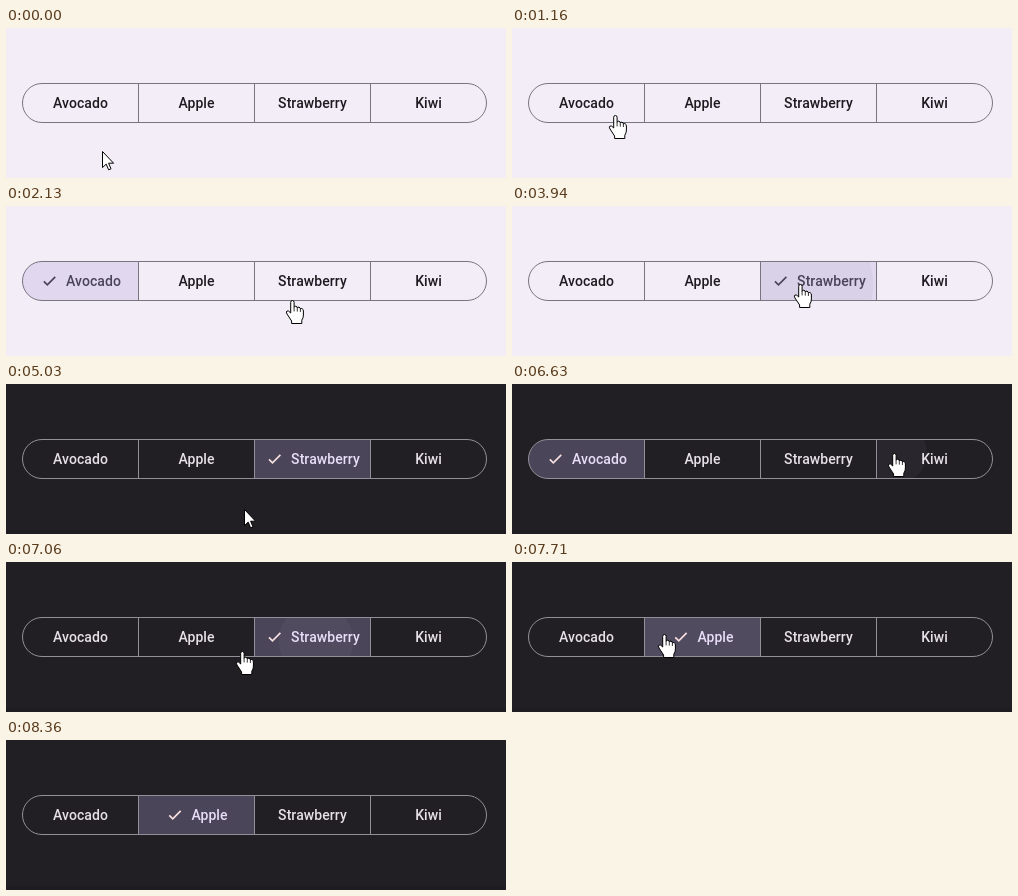
An HTML page for the animation above (8.77 s loop, 500 px wide and 150 px high).

```html
<!DOCTYPE html>
<html lang="en">
<head>
<meta charset="utf-8">
<title>Segmented button</title>
<style>
  html, body { margin: 0; width: 100%; height: 100%; overflow: hidden; }
  svg { display: block; width: 100vw; height: 100vh; }
  text { font: 500 14px Roboto, sans-serif; letter-spacing: .08px; text-anchor: middle; }
</style>
</head>
<body>
<svg viewBox="0 0 500 150">
  <defs id="defs">
    <clipPath id="pill"><rect x="16.5" y="55.5" width="464" height="39" rx="19.5"/></clipPath>
  </defs>
  <rect id="page" width="500" height="150"/>
  <rect id="edge" y="146" width="500" height="4" fill="#1e1c21"/>
  <g id="fills" clip-path="url(#pill)"></g>
  <g id="frame" fill="none">
    <rect x="16.5" y="55.5" width="464" height="39" rx="19.5"/>
    <path d="M132.5 55.5v39M248.5 55.5v39M364.5 55.5v39"/>
  </g>
  <g id="labels"></g>
  <path id="check" d="M-5.6 .3 -2.1 3.8 5.8 -4.1" fill="none" stroke-width="1.7"/>
  <g id="cursor" fill="#fff" stroke="#000" stroke-linejoin="round">
    <path id="arrow" d="M.5.5V16.6L4.2 13.1 6.6 18.8 9 17.8 6.6 12.2H11.6Z"/>
    <g id="hand">
      <path d="M-2.3 2.3Q-2.3.5-.6.5Q1.1.5 1.1 2.3V7.4Q1.4 6 2.8 6.2Q4.3 6.4 4.3 8Q4.8 6.9 6 7.2Q7.4 7.6 7.4 9Q8.2 8.2 9.2 8.7Q10.4 9.3 10.4 11V15Q10.4 18 8.8 20.2V23.5H-1.4V21L-6 14Q-7.3 11.8-6 11Q-4.5 10.2-2.3 13Z"/>
      <path d="M1.1 7.4v4M4.3 8v3.6M7.4 9v3" fill="none" stroke-width=".8"/>
    </g>
  </g>
</svg>
<script>
const LOOP = 8770, DARK_AT = 4040;
const SEG = 116, LEFT = 16.5, TOP = 55.5, HEIGHT = 39;
const GROW = 330, RADIUS = 72, SELECT_DELAY = 160;
const names = ['Avocado', 'Apple', 'Strawberry', 'Kiwi'];

const light = { page: '#f3edf7', line: '#79747e', text: '#1d1b20', fill: '#e1d8f0', on: '#4a4458', check: '#4a4458', layer: '#1d1b20' };
const dark = { page: '#211f24', line: '#938f99', text: '#e6e0e9', fill: '#4b4559', on: '#e8def8', check: '#f6e0df', layer: '#e6e0e9' };

// Pointer moves after its first rest: start, end, where to.
const rest = { x: 96, y: 123 };
const moves = [
  { from: 60, to: 270, x: 91, y: 119 },
  { from: 530, to: 1400, x: 105, y: 84 },
  { from: 1735, to: 2280, x: 303, y: 95 },
  { from: 2510, to: 2850, x: 289, y: 78 },
  { from: 4890, to: 5040, x: 238, y: 125 },
  { from: 5040, to: 5420, x: 85, y: 82 },
  { from: 5840, to: 6470, x: 383, y: 69 },
  { from: 6720, to: 7060, x: 237, y: 89 },
  { from: 7060, to: 7300, x: 153, y: 72 },
  { from: 7690, to: 8350, x: 480, y: 152 }
];

const $ = id => document.getElementById(id);
const clamp = v => Math.max(0, Math.min(1, v));
const ease = u => u < .5 ? 4 * u ** 3 : 1 - 4 * (1 - u) ** 3;

function set(el, attrs) {
  for (const key in attrs) el.setAttribute(key, attrs[key]);
}

function add(parent, tag, attrs) {
  const el = document.createElementNS('http://www.w3.org/2000/svg', tag);
  set(el, attrs);
  return parent.appendChild(el);
}

function pointer(t) {
  let { x, y } = rest;
  for (const m of moves) {
    const s = ease(clamp((t - m.from) / (m.to - m.from)));
    x += (m.x - x) * s;
    y += (m.y - y) * s;
  }
  return { x, y };
}

function segmentAt({ x, y }) {
  const i = Math.floor((x - LEFT) / SEG);
  return y >= TOP && y <= TOP + HEIGHT && i in names ? i : -1;
}

const cells = names.map((name, i) => {
  const box = { x: LEFT + SEG * i, y: TOP, width: SEG, height: HEIGHT };
  add(add($('defs'), 'clipPath', { id: 'seg' + i }), 'rect', box);
  const label = add($('labels'), 'text', { y: 80 });
  label.textContent = name;
  return { label, center: box.x + SEG / 2, fill: add($('fills'), 'rect', box) };
});

// Each press selects the segment under the pointer.
const presses = [1500, 2850, 5430, 6485, 6890, 7180].map(time => {
  const tip = pointer(time), seg = segmentAt(tip);
  const group = add($('fills'), 'g', { 'clip-path': `url(#seg${seg})` });
  return { time, seg, wave: add(group, 'circle', { cx: tip.x, cy: tip.y }) };
});

function draw(t) {
  const isDark = t >= DARK_AT, c = isDark ? dark : light;
  const tip = pointer(t), over = segmentAt(tip);
  const last = presses.filter(p => p.time + SELECT_DELAY <= t).pop();
  const chosen = last ? last.seg : -1;

  set($('page'), { fill: c.page });
  set($('edge'), { visibility: isDark ? 'visible' : 'hidden' });
  set($('frame'), { stroke: c.line });

  cells.forEach(({ label, fill, center }, i) => {
    const on = i === chosen;
    set(fill, { fill: on ? c.fill : 'none' });
    set(label, { x: center + (on ? 13 : 0), fill: on ? c.on : c.text });
  });

  set($('check'), { visibility: last ? 'visible' : 'hidden', stroke: c.check });
  if (last) {
    const { label, center } = cells[chosen];
    set($('check'), { transform: `translate(${center - label.getComputedTextLength() / 2 - 3.5} 75)` });
  }

  // A ripple stays until it has grown, or longer while the pointer rests on it.
  presses.forEach((p, i) => {
    const age = t - p.time, next = presses[i + 1];
    const held = over === p.seg && !(next && t >= next.time);
    set(p.wave, {
      r: RADIUS * clamp(age / GROW),
      fill: c.layer,
      opacity: age > 0 && (age < GROW || held) ? .04 : 0
    });
  });

  set($('cursor'), { transform: `translate(${Math.round(tip.x)} ${Math.round(tip.y)})` });
  $('hand').style.display = over < 0 ? 'none' : '';
  $('arrow').style.display = over < 0 ? '' : 'none';
}

const start = performance.now();
function tick() {
  draw((performance.now() - start) % LOOP);
  requestAnimationFrame(tick);
}
tick();
</script>
</body>
</html>
```
